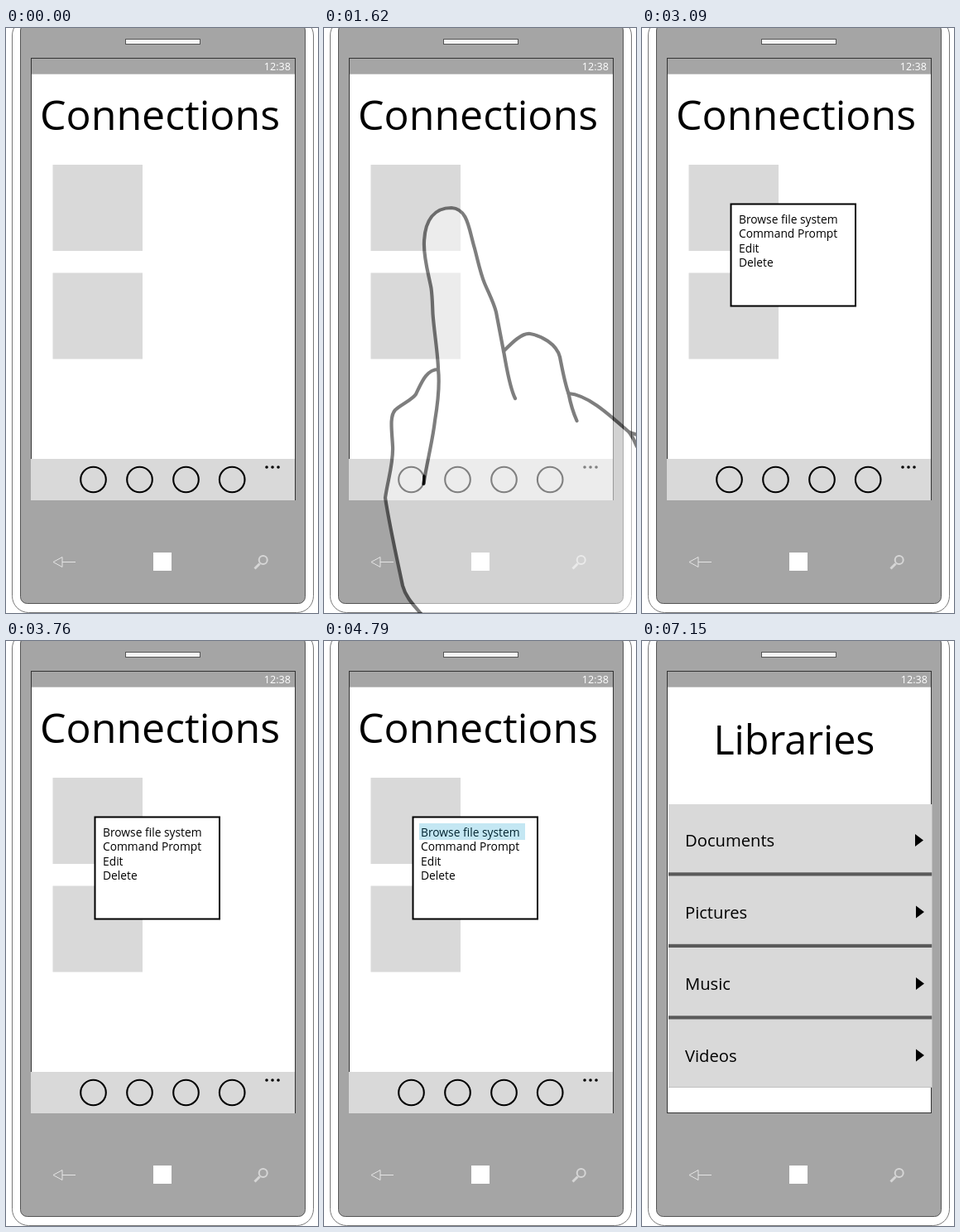
An HTML page that plays this animation: 377x706 px, repeating every 8.03 s.

```html
<!DOCTYPE html>
<html lang="en">
<head>
<meta charset="utf-8">
<title>Connections</title>
<style>
  html, body { margin: 0; width: 100%; height: 100%; overflow: hidden; background: #fff; }
  svg { display: block; width: 377px; height: 706px; font-family: "Open Sans", "Noto Sans", sans-serif; }
  .line { fill: none; stroke: #000; }
  .panel { fill: #d9d9d9; }
  #menu text { font-size: 13.8px; }
  #rows text { font-size: 20.2px; }
</style>
</head>
<body>
<svg viewBox="0 0 377 706">
  <!-- phone body -->
  <rect x="7.5" y="-11" width="364" height="716.5" rx="20" fill="#fff" stroke="#777"/>
  <rect x="17.5" y="-5" width="344" height="699.5" rx="8" fill="#a5a5a5" stroke="#555"/>
  <rect x="144.5" y="13.5" width="90" height="6" fill="#f4f4f4" stroke="#555"/>
  <rect x="30.5" y="36.5" width="319" height="533" fill="#fff" stroke="#333"/>
  <rect x="31" y="37" width="318" height="18.7" fill="#a5a5a5"/>
  <text id="clock" y="51" text-anchor="end" font-size="12.6" fill="#fff">12:38</text>
  <path d="M68 638.5 57 644.5 68 650.5ZM68 644.5H84" fill="none" stroke="#e4e4e4"/>
  <rect x="178" y="633" width="22" height="22" fill="#fff"/>
  <g fill="none" stroke="#d6d6d6">
    <circle cx="310.7" cy="642" r="5" stroke-width="2"/>
    <path d="M306.5 646.5 300.5 652.5" stroke-width="3"/>
  </g>

  <g id="home">
    <text x="41" y="122.5" font-size="50">Connections</text>
    <rect class="panel" x="56.5" y="165" width="108.5" height="104"/>
    <rect class="panel" x="56.5" y="295.5" width="108.5" height="104"/>
    <rect class="panel" x="30" y="520" width="319" height="50"/>
    <g class="line" stroke-width="2.1">
      <circle cx="105.5" cy="545" r="15.3"/>
      <circle cx="161.5" cy="545" r="15.3"/>
      <circle cx="217.5" cy="545" r="15.3"/>
      <circle cx="273.2" cy="545" r="15.3"/>
    </g>
    <path class="line" d="M315 530h.01m7 0h.01m7 0h.01" stroke-width="3.6" stroke-linecap="round"/>
  </g>

  <g id="menu">
    <rect x="107.5" y="212.5" width="150.5" height="123" fill="#fff" stroke="#000" stroke-width="2"/>
    <text x="117" y="235.5">Browse file system</text>
    <text x="117" y="253">Command Prompt</text>
    <text x="117" y="270.5">Edit</text>
    <text x="117" y="288">Delete</text>
    <rect id="pick" x="115" y="220" width="128" height="20" fill="#0098cc" opacity=".23"/>
  </g>

  <g id="hand">
    <g opacity=".5" stroke="#000" stroke-width="4.2" stroke-linecap="round" stroke-linejoin="round">
      <path fill="#fff" d="M118 708C110 698 99 688 95 673C88 640 79 600 74 567C77 546 84 525 83 505
        C82 485 79 469 86 461C94 454 106 449 111 442C117 430 123 412 138 412
        C138 396 133 366 131.5 345C131 335 131 325 129.5 314C126 296 120 276 121 258C122 232 133 217 154 217
        C174 218 175 243 182 266C186 281 189 296 194 308C199 320 205 331 208 343C211 359 214 375 217 390
        C228 379 239 368 249 369C262 371 281 381 285 397C288 412 291 429 295.5 441
        C320 443 346 468 369 488L385 493V716H118Z"/>
      <path fill="none" d="M138 412C140 430 138 450 134 474C131 500 124 525 120.5 550
        M217 390C221 411 224 433 231 447M295.5 441C298 454 301 464 305.5 474M369 488Q374 495 378 505"/>
    </g>
    <path class="line" d="M121 541 120.5 550" stroke-width="3.6" stroke-linecap="round" opacity=".8"/>
  </g>

  <g id="library">
    <text x="86.5" y="137" font-size="48.4">Libraries</text>
    <rect x="32" y="197" width="318" height="342" fill="#5a5a5a"/>
    <path d="M31.5 197V539" stroke="#fff"/>
    <g id="rows"></g>
  </g>
</svg>
<script>
  const el = id => document.getElementById(id);
  const show = (id, on) => { el(id).style.display = on ? "" : "none"; };

  el("rows").innerHTML = ["Documents", "Pictures", "Music", "Videos"].map((name, i) => {
    const y = 197 + i * 86.5, x = i ? 331 : 330;
    return `<rect class="panel" x="32" y="${y}" width="318.5" height="82.3"/>
      <text x="52" y="${y + 51}">${name}</text>
      <path d="M${x} ${y + 36}l10 7.5-10 7.5z"/>`;
  }).join("");

  const LOOP = 8030;
  const start = performance.now();

  function draw(now) {
    const t = Math.max(0, now - start) % LOOP;
    const within = (a, b) => t >= a && t < b;
    const library = t >= 5840;
    show("home", !library);
    show("library", library);
    show("menu", within(2250, 5840));
    show("pick", within(4200, 5840));
    show("hand", within(1620, 3090) || within(4200, 4790));
    el("clock").setAttribute("x", library ? 345 : 344);
    requestAnimationFrame(draw);
  }
  draw(start);
</script>
</body>
</html>
```
